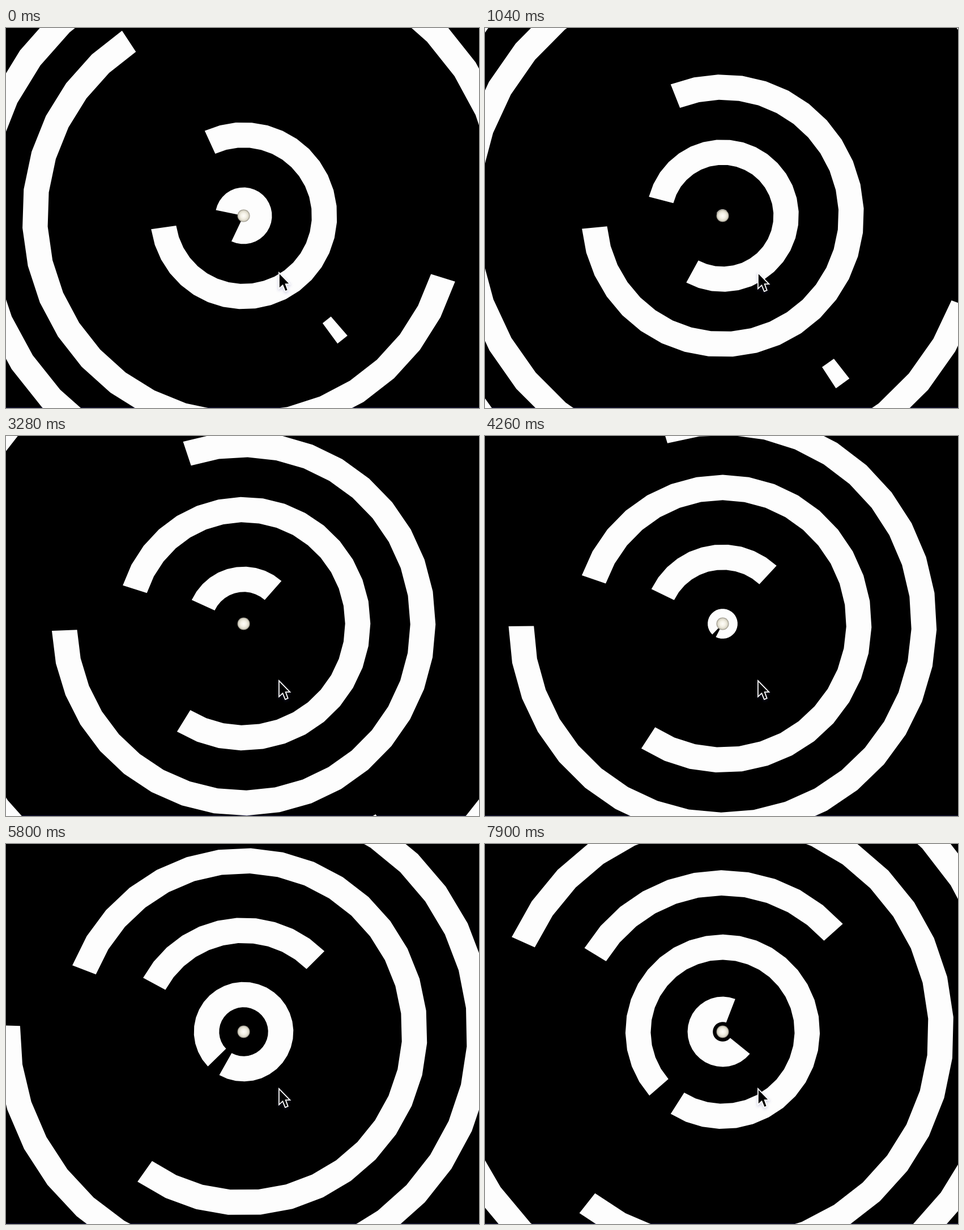
These frames come from a looping animation (835x671 px, 8 s). An HTML page with a canvas:

```html
<!DOCTYPE html>
<html lang="en">
<head>
<meta charset="utf-8">
<title>Expanding rings</title>
<style>
  html, body { margin: 0; width: 100%; height: 100%; overflow: hidden; background: #000; }
  canvas { display: block; }
</style>
</head>
<body>
<canvas id="stage" width="835" height="671"></canvas>
<script>
const ctx = document.getElementById('stage').getContext('2d');
const LOOP = 8000, CX = 419.5, CY = 331.5, THICKNESS = 44.6;
const DEGREES_PER_PIXEL = 0.0357;

// Outer radius, start and end angle (degrees, clockwise) at time zero.
const rings = [
  [491, 66.5, 366.5],
  [391, 17.3, 236.7],
  [280, 49.1, 53.7],
  [165, 245.4, 531.7],
  [50, 191.4, 475.5],
  [-73, 198.4, 305.3],
  [-186.5, 126.1, 469.5],
  [-296.2, 26.3, 278.3]
];

// Even 30 ms steps at first, then smaller steps held for 100, 20 and 20 ms.
function growth(t) {
  if (t < 480) return Math.floor(t / 30) * 3.88;
  const u = t - 480, rest = u % 140;
  const steps = 3 * Math.floor(u / 140) + (rest >= 100) + (rest >= 120);
  return 16 * 3.88 + steps * 1.862;
}

function drawRing(outer, start, end) {
  if (outer <= 0) return;
  const inner = Math.max(0, outer - THICKNESS);
  const facets = Math.max(1, Math.round((end - start) / 10));
  const point = (radius, i) => {
    const a = (start + (end - start) * i / facets) * Math.PI / 180;
    ctx.lineTo(CX + radius * Math.cos(a), CY + radius * Math.sin(a));
  };
  ctx.beginPath();
  for (let i = 0; i <= facets; i++) point(outer, i);
  for (let i = facets; i >= 0; i--) point(inner, i);
  ctx.fill();
}

const ballFill = ctx.createRadialGradient(CX, CY, 0, CX, CY, 11);
ballFill.addColorStop(0, '#fffefa');
ballFill.addColorStop(0.45, '#f4f1e6');
ballFill.addColorStop(0.8, '#dcd8c9');
ballFill.addColorStop(1, '#8f8b80');

function drawBall() {
  ctx.fillStyle = ballFill;
  ctx.beginPath();
  ctx.arc(CX, CY, 11, 0, 2 * Math.PI);
  ctx.fill();
}

const pointer = new Path2D('M482 432.5V460L488.5 454L493 465L497.5 463L493.5 452H501Z');

function drawPointer() {
  ctx.save();
  ctx.lineWidth = 2;
  ctx.strokeStyle = '#fdfdfd';
  ctx.shadowColor = 'rgba(60, 60, 150, 0.35)';
  ctx.shadowBlur = 5;
  ctx.shadowOffsetY = 2;
  ctx.stroke(pointer);
  ctx.restore();
  ctx.fillStyle = '#000';
  ctx.fill(pointer);
  ctx.lineWidth = 1.6;
  ctx.strokeStyle = '#fdfdfd';
  ctx.stroke(pointer);
}

function draw(now) {
  const p = growth(now % LOOP), turn = p * DEGREES_PER_PIXEL;
  ctx.fillStyle = '#000';
  ctx.fillRect(0, 0, 835, 671);
  ctx.fillStyle = '#14143c';
  ctx.fillRect(0, 670, 835, 1);
  ctx.fillStyle = '#fdfdfd';
  for (const [radius, start, end] of rings) drawRing(radius + p, start + turn, end + turn);
  drawBall();
  drawPointer();
}

let origin;
function tick(now) {
  origin ??= now;
  draw(Math.max(0, now - origin));
  requestAnimationFrame(tick);
}
draw(0);
requestAnimationFrame(tick);
</script>
</body>
</html>
```
